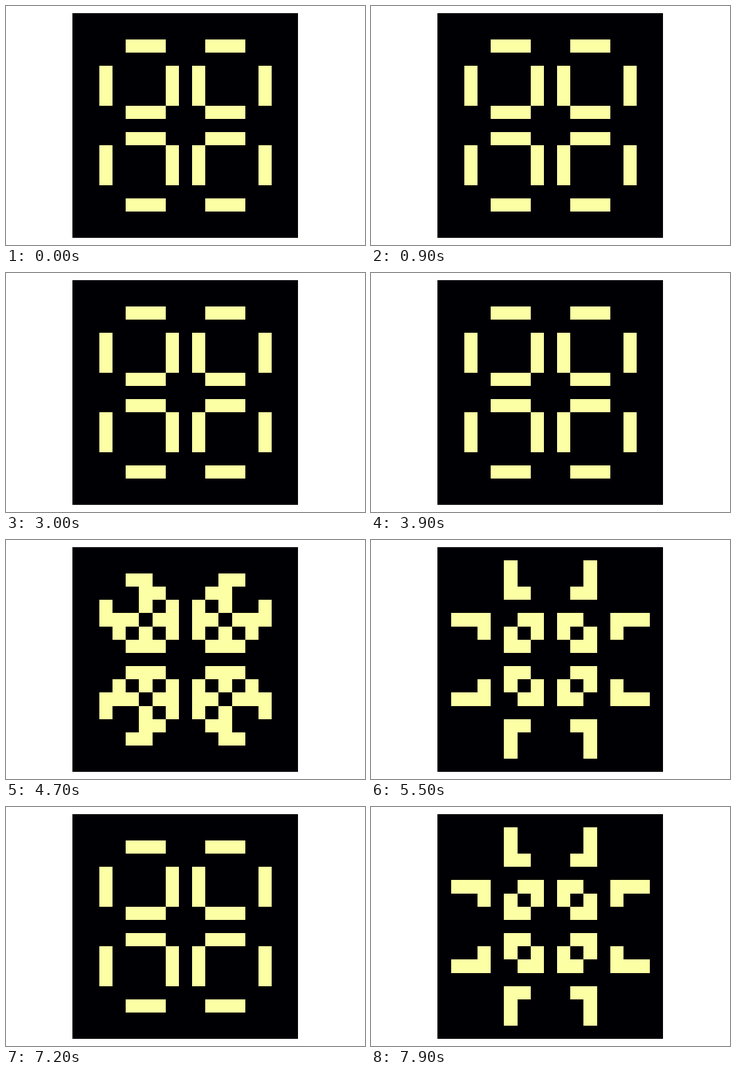
These frames come from a looping animation (600x400 px, 8 s). An HTML page with a canvas:

```html
<!DOCTYPE html>
<html lang="en">
<head>
<meta charset="utf-8">
<title>Pulsar</title>
<style>
  html, body { margin: 0; width: 600px; height: 400px; overflow: hidden; background: #fff; }
  canvas { display: block; }
</style>
</head>
<body>
<canvas width="600" height="400"></canvas>
<script>
const ctx = document.querySelector('canvas').getContext('2d');
const SIZE = 17, CELL = 22.15, STEP = 100, LOOP = 8000;

// Pulsar seed: bars of three cells, mirrored in both axes
const bars = [2, 7, 9, 14], spans = [4, 5, 6, 10, 11, 12];
const makeGrid = rule => Array.from({ length: SIZE }, (_, y) =>
  Array.from({ length: SIZE }, (_, x) => rule(x, y)));
const seed = makeGrid((x, y) =>
  bars.includes(x) && spans.includes(y) || bars.includes(y) && spans.includes(x));

// One generation of Conway's Game of Life
function evolve(grid) {
  return makeGrid((x, y) => {
    let count = 0;
    for (let dy = -1; dy <= 1; dy++)
      for (let dx = -1; dx <= 1; dx++)
        if ((dx || dy) && grid[y + dy]?.[x + dx]) count++;
    return count === 3 || count === 2 && grid[y][x];
  });
}

const second = evolve(seed);
const phases = [seed, second, evolve(second)];
const edge = i => Math.round((i - SIZE / 2) * CELL);

function draw(grid) {
  ctx.fillStyle = '#fff';
  ctx.fillRect(0, 0, 600, 400);
  ctx.fillStyle = '#000004';
  ctx.fillRect(111, 12, 377, 376);
  ctx.fillStyle = '#fcffa4';
  grid.forEach((row, y) => row.forEach((alive, x) => {
    if (alive) ctx.fillRect(300 + edge(x), 200 + edge(y),
      edge(x + 1) - edge(x), edge(y + 1) - edge(y));
  }));
}

function frame() {
  const generation = Math.floor(performance.now() % LOOP / STEP);
  draw(phases[generation % 3]);
  requestAnimationFrame(frame);
}
frame();
</script>
</body>
</html>
```
